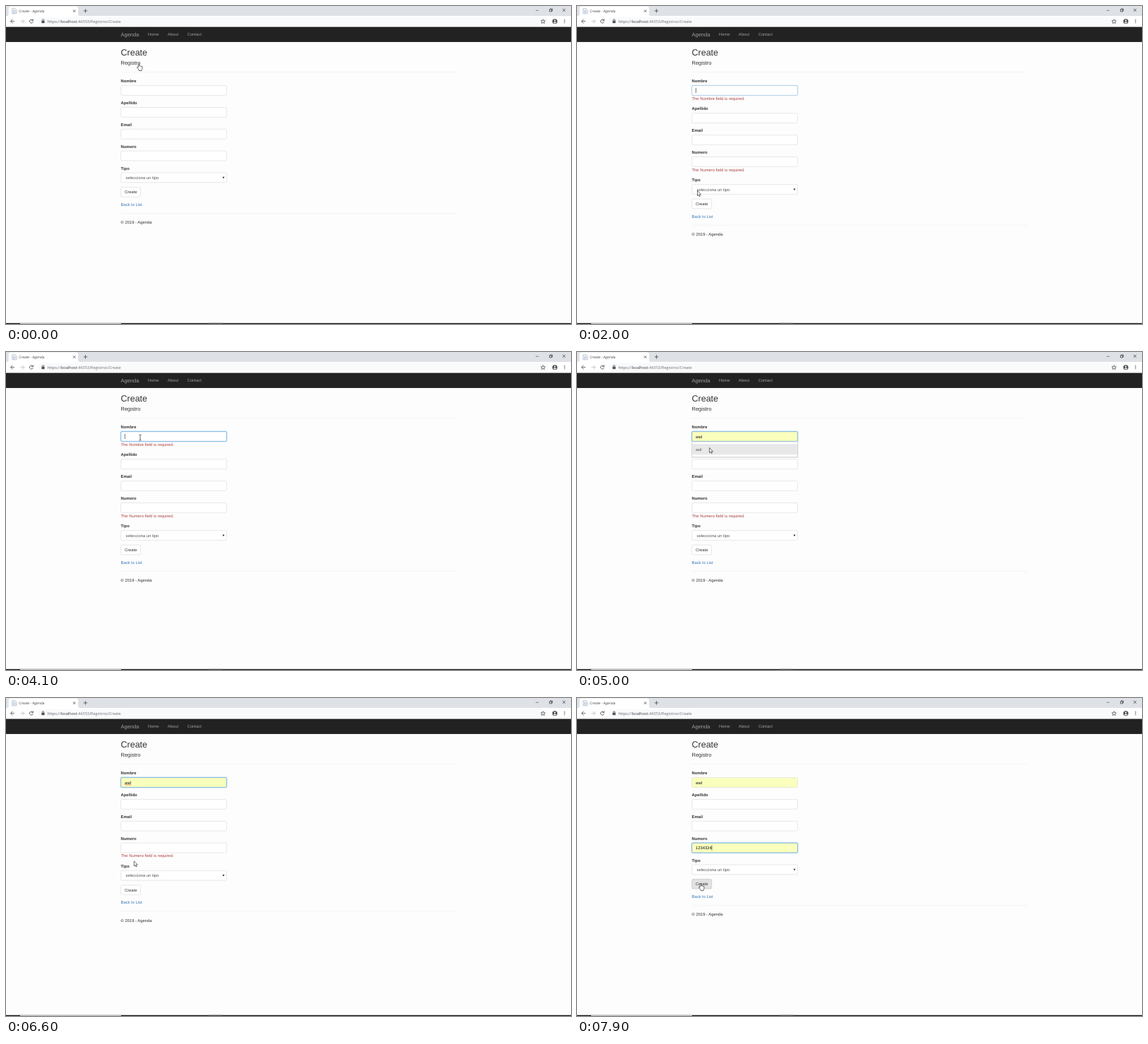
Recreate the animation shown at these times as an HTML page. Size 800 by 450 pixels, loop 8 s.

```html
<!DOCTYPE html>
<html lang="es">
<head>
<meta charset="utf-8">
<title>Create - Agenda</title>
<style>
html, body { margin: 0; width: 100%; height: 100%; overflow: hidden; background: #fefdfe; }
svg { display: block; width: 800px; height: 450px; text-rendering: geometricPrecision; font: 14px "Liberation Sans", Arial, sans-serif; }
.ui { font-family: "Open Sans", "Noto Sans", sans-serif; }
.icon { fill: none; stroke: #4b4e52; stroke-width: 2; }
.label { font-weight: 700; fill: #333; }
.error { fill: #a94442; }
.nav { fill: #9d9d9d; }
</style>
</head>
<body>
<svg id="stage" viewBox="0 0 1920 1080">
  <rect width="1920" height="1080" fill="#fefdfe"/>

  <!-- browser frame -->
  <rect width="1920" height="34" fill="#dee1e6"/>
  <rect y="34" width="1920" height="37" fill="#fff"/>
  <path d="M2 34q7 0 7-7V8q0-7 7-7h222q7 0 7 7v19q0 7 7 7z" fill="#fff"/>
  <path d="M21 9h10l5 5v12H21z" fill="#f4f7fa" stroke="#9aa5b1" stroke-width="1.5"/>
  <path d="M24 16h8M24 19h9M24 22h7" stroke="#7fa6cf" stroke-width="1.3"/>
  <text class="ui" x="43.5" y="21" font-size="11.8" fill="#3c4043">Create - Agenda</text>
  <g class="icon">
    <path d="M228 13l8 8m0-8l-8 8M270 10v13M263.500 16.500h13"/>
    <path d="M1800 15h10" stroke-width="1.5"/>
    <path d="M1847 12h7v7h-7zM1849 12v-2.500h7.500v7.500h-2.500" stroke-width="1.5" stroke="#222"/>
    <path d="M1891 9l10 10m0-10l-10 10" stroke-width="1.5" stroke="#222"/>
    <path d="M29 52H16M22.500 45l-7 7 7 7"/>
    <path d="M49 52h13M55.500 45l7 7-7 7" stroke="#b9bcc0"/>
    <path d="M91 48a6 6 0 1 0 1 6M92 44v6h-6"/>
  </g>
  <rect x="108" y="38" width="1736" height="28" rx="14" fill="#f9fafb"/>
  <path d="M121 50h10v8h-10z" fill="#4b4e52"/>
  <path d="M123 50v-2a3 3 0 0 1 6 0v2" class="icon" stroke-width="1.6"/>
  <text class="ui" x="140.500" y="56.500" font-size="13.3" fill="#6b6f74"><tspan fill="#5f6368">https://</tspan><tspan fill="#33363a">localhost</tspan>:44353/Registros/Create</text>
  <path d="M1825 45l2.100 4.800 5.200.5-3.900 3.500 1.100 5.100-4.500-2.700-4.500 2.700 1.100-5.100-3.900-3.500 5.200-.5z" class="icon" stroke-width="1.5"/>
  <circle cx="1865" cy="52" r="8.500" fill="#4b4e52"/>
  <circle cx="1865" cy="49.500" r="2.600" fill="#fff"/>
  <path d="M1859.500 56.500q5.500-5 11 0-5.500 5-11 0" fill="#fff"/>
  <path d="M1898 45.500v2.800m0 2.300v2.800m0 2.300v2.800" stroke="#4b4e52" stroke-width="2.800"/>

  <!-- page header -->
  <rect y="71" width="1920" height="51" fill="#222"/>
  <rect y="121" width="1920" height="1" fill="#080808"/>
  <g class="nav">
    <text x="390" y="102" font-size="18">Agenda</text>
    <text x="482" y="101">Home</text>
    <text x="549.300" y="101">About</text>
    <text x="616" y="101">Contact</text>
  </g>
  <g fill="#333">
    <text x="390" y="168" font-size="30">Create</text>
    <text x="390" y="200" font-size="18">Registro</text>
  </g>
  <rect x="390" y="223.800" width="1140" height="1" fill="#e8e8e8"/>

  <g id="form"></g>
  <g id="menu"></g>

  <!-- taskbar edge -->
  <rect y="1077" width="1920" height="3" fill="#111"/>
  <rect x="48" y="1077" width="343" height="3" fill="#c4c4c4"/>
  <rect x="689" y="1077" width="46" height="3" fill="#444"/>

  <g id="pointer" stroke-linejoin="round">
    <path id="arrow" d="M0 0v17l4-3.700 2.600 6.200 2.800-1.200-2.600-6H12z" fill="#fff" stroke="#111" stroke-width="1.400"/>
    <path id="hand" d="M-2 1.500q2-3 4 0v7q2-1.500 3.500 0 2-1 3.500.8 2.500-.6 2.800 1.700v5q0 3-2 5.500v2.500h-9v-2.500l-6-7.500q-.8-2.800 1.500-2.700l1.700 1.700z" fill="#fff" stroke="#111" stroke-width="1.500"/>
    <path id="beam" d="M-4-9.500q3 0 4 1.500 1-1.500 4-1.500M0-8V8M-4 9.500q3 0 4-1.500 1 1.500 4 1.500" fill="none" stroke="#222" stroke-width="1.700"/>
  </g>
</svg>
<script>
const LOOP = 8000, STEP = 100, LEFT = 390, WIDTH = 360, TOP = 244.8, ROW = 74;
const $ = id => document.getElementById(id);

function add(parent, tag, attrs, text) {
  const el = document.createElementNS("http://www.w3.org/2000/svg", tag);
  for (const k in attrs) el.setAttribute(k, attrs[k]);
  if (text) el.textContent = text;
  parent.appendChild(el);
  return el;
}
const set = (el, attrs) => { for (const k in attrs) el.setAttribute(k, attrs[k]); };
const show = (el, on) => el.setAttribute("visibility", on ? "visible" : "hidden");
const shift = (el, x, y) => el.setAttribute("transform", `translate(${x} ${y})`);

const form = $("form");
const box = (g, y, w, attrs) => add(g, "rect", { x: LEFT + .5, y: y + .5, width: w - 1, height: 33, rx: 4, fill: "#fff", stroke: "#c8c8c8", ...attrs });

function makeField(name) {
  const g = add(form, "g", {});
  add(g, "text", { x: LEFT, y: 15, class: "label" }, name);
  const glow = add(g, "g", { fill: "none", stroke: "#66afe9" });
  [[8, .1], [5, .18], [3, .25]].forEach(([w, o]) => box(glow, 25, WIDTH, { fill: "none", stroke: "#66afe9", "stroke-width": w, "stroke-opacity": o }));
  const rect = box(g, 25, WIDTH);
  const edge = box(g, 25, WIDTH, { fill: "none", stroke: "#55a5e6", "stroke-width": 1.4 });
  const value = add(g, "text", { x: 403, y: 47, fill: "#111" });
  const caret = add(g, "rect", { x: 402.6, y: 33.5, width: 1.5, height: 17, fill: "#222" });
  const error = add(g, "text", { x: LEFT, y: 74, class: "error" }, `The ${name} field is required.`);
  return { g, glow, rect, edge, value, caret, error };
}
const fields = ["Nombre", "Apellido", "Email", "Numero"].map(makeField);
const [nombre, , , numero] = fields;
const squiggle = add(nombre.g, "path", { d: "M403 50.500" + "q1.400-3 2.800 0t2.800 0".repeat(4), fill: "none", stroke: "#e0392b", "stroke-width": 1.3 });

// select, button, link and footer move together
const tail = add(form, "g", {});
add(tail, "text", { x: LEFT, y: 15, class: "label" }, "Tipo");
box(tail, 25, WIDTH);
add(tail, "text", { x: 407, y: 47, fill: "#555" }, "selecciona un tipo");
add(tail, "path", { d: "M735.500 39.500h7l-3.500 6z", fill: "#222" });
const button = box(tail, 74, 68);
add(tail, "text", { x: 403, y: 96, fill: "#333" }, "Create");
const link = add(tail, "text", { x: LEFT, y: 138, fill: "#337ab7" }, "Back to List");
add(tail, "rect", { x: LEFT, y: 163, width: 1140, height: 1, fill: "#e8e8e8" });
add(tail, "text", { x: LEFT, y: 199, fill: "#333" }, "© 2019 - Agenda");

function makeMenu(items) {
  const g = add($("menu"), "g", {}), h = items.length * 36 + 16;
  add(g, "rect", { x: LEFT - 1, y: 1, width: WIDTH + 3, height: h + 1.5, fill: "#000", opacity: .12 });
  add(g, "rect", { x: LEFT + .5, y: 0, width: WIDTH - 1, height: h, fill: "#fff", stroke: "#bbb" });
  const hover = add(g, "rect", { x: LEFT + 1, y: 8, width: WIDTH - 2, height: 36, fill: "#e8e8e9" });
  items.forEach((s, i) => add(g, "text", { x: 403, y: 30.5 + 36 * i, class: "ui", "font-size": 12.2, fill: "#333" }, s));
  return { g, hover, h };
}
const nameMenu = makeMenu(["asd"]);
const phoneMenu = makeMenu(["1234324", "54645654", "567", "5667789890890", "1234567890"]);

// pointer path: time, x, y in stage pixels
const path = [
  [0, 188, 81.5], [200, 188, 81.5], [600, 190, 115], [1000, 190, 115],
  [1400, 182, 262], [1500, 178, 279], [1600, 178, 278], [1800, 170.5, 261.5],
  [3200, 170.5, 261.5], [3300, 170.7, 261.7], [3400, 170.7, 261.7],
  [4000, 190, 121], [4500, 190, 121], [4800, 188, 137], [4900, 188, 137],
  [5000, 187.5, 135.5], [5100, 187.5, 135.5], [5800, 180, 212], [6000, 180, 212],
  [6200, 185, 281.5], [6400, 185, 281.5], [6700, 180, 213], [6900, 180, 213],
  [7000, 180, 218], [7100, 179, 225], [7200, 178.5, 223.2], [7300, 178.5, 223.2],
  [7700, 175, 262.5], [8000, 175, 262.5]
];
function pointerAt(t) {
  const i = Math.max(1, path.findIndex(p => p[0] >= t));
  const [t0, x0, y0] = path[i - 1], [t1, x1, y1] = path[i];
  const u = (t - t0) / (t1 - t0), e = u * u * (3 - 2 * u);
  return [(x0 + (x1 - x0) * e) * 2.4, (y0 + (y1 - y0) * e) * 2.4];
}

const within = (t, a, b) => t >= a && t < b;
const ramp = (t, a) => Math.max(0, Math.min(1, (t - a) / 150));

function drawField(f, focus, text, filled, caretX) {
  show(f.glow, focus > 0);
  show(f.edge, focus > 0);
  set(f.glow, { opacity: focus });
  set(f.edge, { opacity: focus });
  set(f.rect, { fill: filled ? "#faffbd" : "#fff" });
  f.value.textContent = text;
  show(f.caret, caretX > 0);
  if (caretX > 0) set(f.caret, { x: caretX });
}

function draw(t) {
  const [px, py] = pointerAt(t);
  const nameError = within(t, 2000, 5100), phoneError = within(t, 2000, 7300);
  const a = nameError ? 20 : 0, b = a + (phoneError ? 20 : 0);
  const tops = fields.map((f, i) => TOP + ROW * i + (i ? a : 0));
  const tailY = TOP + ROW * 4 + b;
  fields.forEach((f, i) => shift(f.g, 0, tops[i]));
  shift(tail, 0, tailY);
  show(nombre.error, nameError);
  show(numero.error, phoneError);
  show(fields[1].error, false);
  show(fields[2].error, false);

  const menuOpen = [within(t, 4200, 5100), within(t, 6800, 7300)];
  const hovers = [nameMenu, phoneMenu].map((m, i) => {
    const y = tops[i * 3] + 60;
    const on = menuOpen[i] && py >= y + 8 && py < y + 44;
    shift(m.g, 0, y);
    show(m.g, menuOpen[i]);
    show(m.hover, on);
    if (!on || !menuOpen[i]) m.hover.setAttribute("visibility", "hidden");
    return on;
  });

  const nameSet = t >= 5100, phoneSet = t >= 7300;
  let caret1 = 0, caret2 = 0;
  if (within(t, 2000, 4100)) caret1 = (t - 2000) % 1000 < 500 || t >= 4000 ? 403 : 0;
  else if (within(t, 4100, 4600)) caret1 = 403;
  else if (within(t, 5100, 6700)) caret1 = (t - 5100) % 1000 < 500 ? 425.5 : 0;
  if (within(t, 6700, 7300)) caret2 = 402.6;
  else if (phoneSet) caret2 = 457.5;

  const focus1 = t < 6700 ? ramp(t, 1930) : 1 - ramp(t, 6630);
  drawField(nombre, focus1, nameSet || hovers[0] ? "asd" : "", nameSet || hovers[0], caret1);
  drawField(numero, ramp(t, 6630), phoneSet || hovers[1] ? "1234324" : "", phoneSet || hovers[1], caret2);
  drawField(fields[1], 0, "", false, 0);
  drawField(fields[2], 0, "", false, 0);
  show(squiggle, within(t, 5100, 6700));

  const hit = (y, h, w) => px >= LEFT && px < LEFT + w && py >= y && py < y + h;
  const overMenu = (menuOpen[0] && hit(tops[0] + 60, nameMenu.h, WIDTH)) || (menuOpen[1] && hit(tops[3] + 60, phoneMenu.h, WIDTH));
  const overButton = !overMenu && hit(tailY + 74, 34, 68);
  const overLink = !overMenu && hit(tailY + 123, 20, 74);
  const overInput = !overMenu && tops.some(y => hit(y + 25, 34, WIDTH));
  set(button, { fill: overButton ? "#e2e2e2" : "#fff", stroke: overButton ? "#adadad" : "#c8c8c8" });
  set(link, { fill: overLink ? "#23527c" : "#337ab7", "text-decoration": overLink ? "underline" : "none" });

  const kind = t < 300 || overButton || overLink ? "hand" : overInput ? "beam" : "arrow";
  ["hand", "beam", "arrow"].forEach(k => show($(k), k === kind));
  shift($("pointer"), px, py);
}

function tick(now) {
  draw(Math.floor((now % LOOP) / STEP) * STEP);
  requestAnimationFrame(tick);
}
draw(0);
requestAnimationFrame(tick);
</script>
</body>
</html>
```
